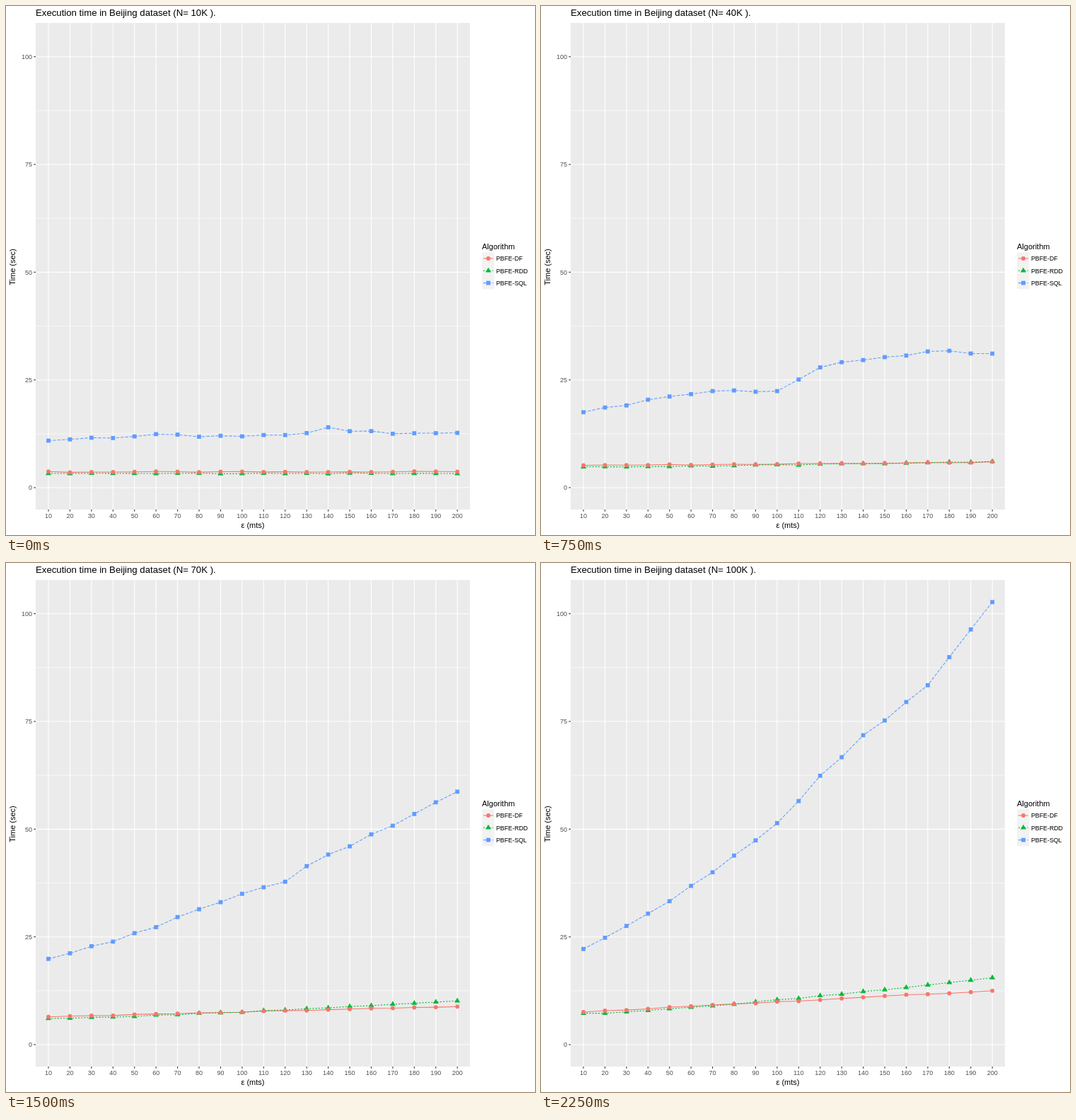
These frames come from a looping animation (748 by 748 pixels, 2500 ms). An HTML page:

```html
<!DOCTYPE html>
<html lang="en">
<head>
<meta charset="utf-8">
<title>Execution time</title>
<style>
  html, body { margin: 0; width: 100%; height: 100%; overflow: hidden; background: #fff; }
  svg { display: block; width: 748px; height: 748px; font-family: "Liberation Sans", Arial, sans-serif; }
  .tick { font-size: 9px; fill: #4d4d4d; }
  .key { font-size: 8.8px; }
  .label { font-size: 11px; }
  .title { font-size: 13.2px; }
</style>
</head>
<body>
<svg id="chart" viewBox="0 0 748 748"></svg>
<script>
const STEP = 250, COUNT = 10, POINTS = 20;
const LEFT = 42, RIGHT = 656, TOP = 24, BOTTOM = 712;
const ZERO = 681, UNIT = 6.093;

// Bends of the SQL curve: seconds at a few columns, for each size in thousands.
const bends = [0, 3, 6, 9, 11, 13, 16, 19];
const sqlKeys = {
  10: [10.9, 11.5, 12.3, 11.9, 12.2, 14, 12.5, 12.7],
  20: [16.6, 18.1, 19.4, 20.5, 17.6, 22.9, 23.5, 18.5],
  40: [17.5, 20.4, 22.4, 22.4, 27.9, 29.6, 31.6, 31.1],
  50: [18.8, 22.2, 23, 27.3, 29.3, 30.8, 36.7, 39.9],
  70: [19.9, 23.9, 29.6, 35, 37.8, 44.1, 50.8, 58.7],
  90: [21.6, 27.2, 35.7, 45.3, 51.9, 59.5, 73, 84],
  100: [22.2, 30.4, 40, 51.4, 62.4, 71.8, 83.4, 102.7]
};
const sizes = Object.keys(sqlKeys).map(Number);

const mix = (a, b, k) => a + (b - a) * k;

// Finds the segment of stops that holds v and how far along it v lies.
function locate(stops, v) {
  const hi = Math.max(1, stops.findIndex(s => s >= v));
  return { lo: hi - 1, hi, k: (v - stops[hi - 1]) / (stops[hi] - stops[hi - 1]) };
}

// Repeatable noise from -1 to 1.
function noise(seed, i) {
  const v = Math.sin(seed * 12.9898 + i * 78.233) * 43758.5453;
  return (v - Math.floor(v)) * 2 - 1;
}

// Running time in seconds for n thousand points at column i.
const base = n => 3.1 + 0.055 * n - 0.0001 * n * n;
const growth = (n, i, rate, power) => rate * n * n * (i / (POINTS - 1)) ** power;

const dfTime = (n, i) => base(n) + growth(n, i, 0.00049, 1) + 0.1 * noise(n, i);
const rddTime = (n, i) => base(n) - 0.4 + growth(n, i, 0.00083, 1.3) + 0.1 * noise(n + 1, i);

function sqlTime(n, i) {
  const size = locate(sizes, n), col = locate(bends, i);
  const key = c => mix(sqlKeys[sizes[size.lo]][c], sqlKeys[sizes[size.hi]][c], size.k);
  const wobble = 2 * col.k * (1 - col.k) * noise(n + 2, i);
  return mix(key(col.lo), key(col.hi), col.k) + wobble;
}

const dot = (x, y) => `<circle cx="${x}" cy="${y}" r="2.95"/>`;
const triangle = (x, y) => `<path d="M${x} ${y - 4.6}l4 6.9h-8z"/>`;
const square = (x, y) => `<rect x="${x - 2.9}" y="${y - 2.9}" width="5.8" height="5.8"/>`;

const series = [
  { name: "PBFE-DF", time: dfTime, color: "#f8766d", dash: "none", mark: dot },
  { name: "PBFE-RDD", time: rddTime, color: "#00ba38", dash: "2.1 2.1", mark: triangle },
  { name: "PBFE-SQL", time: sqlTime, color: "#619cff", dash: "4.3 2.1", mark: square }
];

const xAt = i => 60 + i * 30.43;
const yAt = sec => ZERO - sec * UNIT;
const rect = (x, y, w, h, fill) => `<rect x="${x}" y="${y}" width="${w}" height="${h}" fill="${fill}"/>`;
const line = (x1, y1, x2, y2, color, width) =>
  `<path d="M${x1} ${y1}L${x2} ${y2}" stroke="${color}" stroke-width="${width}"/>`;
const text = (cls, x, y, str, anchor = "start", extra = "") =>
  `<text class="${cls}" x="${x}" y="${y}" text-anchor="${anchor}" ${extra}>${str}</text>`;
const path = (s, points) =>
  `<path d="M${points.join("L")}" fill="none" stroke="${s.color}" stroke-width="1.07" stroke-dasharray="${s.dash}"/>`;

function axes() {
  let out = rect(LEFT, TOP, RIGHT - LEFT, BOTTOM - TOP, "#ebebeb");
  for (let v = 12.5; v < 100; v += 25) out += line(LEFT, yAt(v), RIGHT, yAt(v), "#fff", 0.6);
  for (let v = 0; v <= 100; v += 25) {
    const y = yAt(v);
    out += line(LEFT, y, RIGHT, y, "#fff", 1.1) + line(LEFT - 2.75, y, LEFT, y, "#333", 1.07);
    out += text("tick", 37, y + 3.2, v, "end");
  }
  for (let i = 0; i < POINTS; i++) {
    const x = xAt(i);
    out += line(x, TOP, x, BOTTOM, "#fff", 1.1) + line(x, BOTTOM, x, BOTTOM + 2.75, "#333", 1.07);
    out += text("tick", x, 724, (i + 1) * 10, "middle");
  }
  out += text("label", 349, 738, "ε (mts)", "middle");
  return out + text("label", 13, 369, "Time (sec)", "middle", 'transform="rotate(-90 13 369)"');
}

function legend() {
  let out = text("label", 673, 344, "Algorithm");
  series.forEach((s, i) => {
    const y = 357 + i * 17.3;
    out += rect(673.2, y - 8.64, 17.28, 17.28, "#f2f2f2");
    out += path(s, [[674.9, y], [688.8, y]]);
    out += `<g fill="${s.color}">${s.mark(682, y)}</g>`;
    out += text("key", 693, y + 3.2, s.name);
  });
  return out;
}

function plot(n) {
  let lines = "", marks = "";
  for (const s of series) {
    const points = Array.from({ length: POINTS }, (_, i) => [xAt(i), yAt(s.time(n, i))]);
    lines += path(s, points);
    marks = `<g fill="${s.color}">${points.map(p => s.mark(...p)).join("")}</g>` + marks;
  }
  return text("title", 42, 14, `Execution time in Beijing dataset (N= ${n}K ).`) + lines + marks;
}

const chart = document.getElementById("chart");
chart.innerHTML = axes() + legend() + '<g id="plot"></g>';
const layer = document.getElementById("plot");
const start = performance.now();
let shown = -1;

function draw() {
  const step = Math.floor((performance.now() - start) / STEP) % COUNT;
  if (step !== shown) {
    shown = step;
    layer.innerHTML = plot((step + 1) * 10);
  }
  requestAnimationFrame(draw);
}
draw();
</script>
</body>
</html>
```
